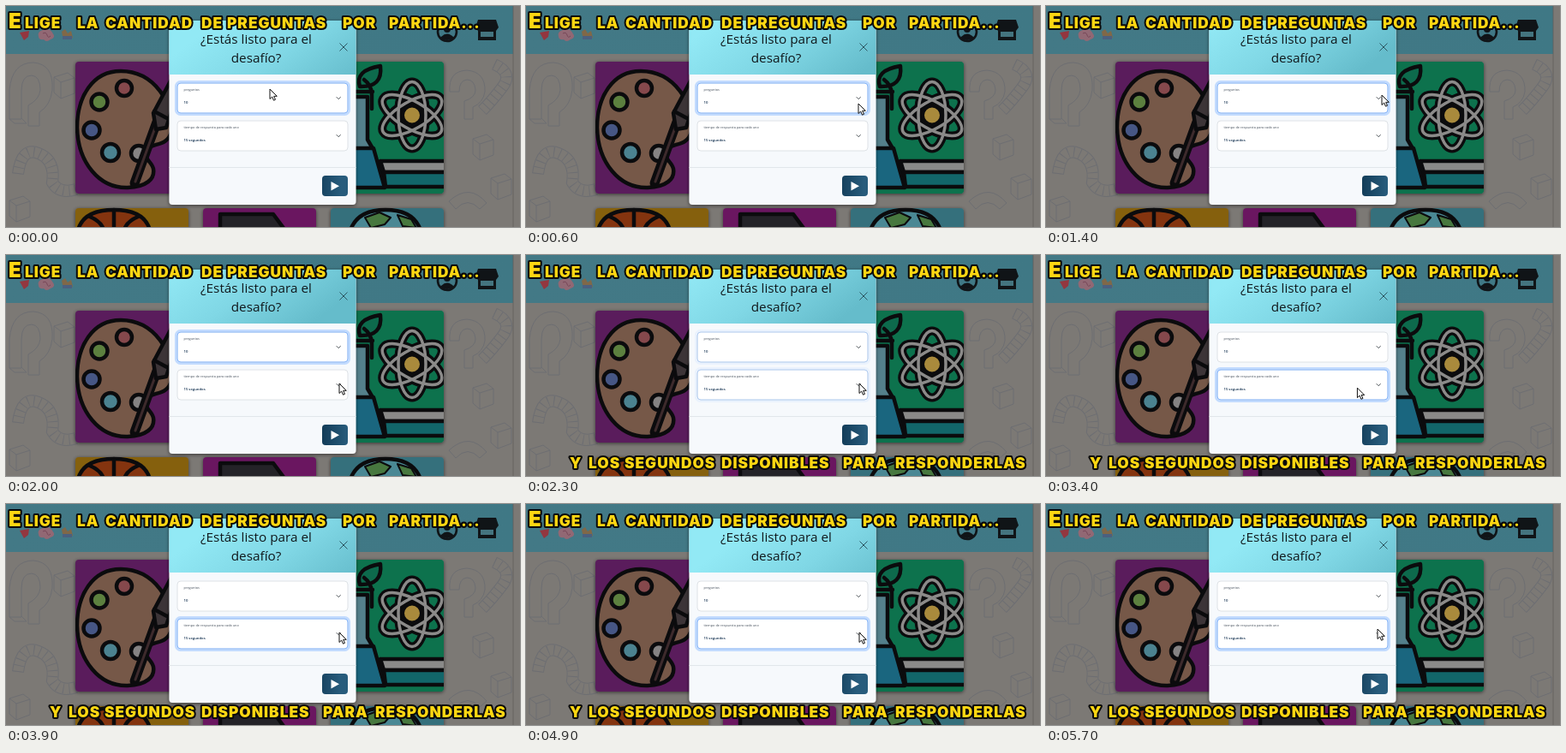
Recreate the animation shown at these times as an HTML page. Size 600 by 258 pixels, loop 6.1 s.

```html
<!DOCTYPE html>
<html lang="es">
<head>
<meta charset="utf-8">
<style>
  html, body { margin: 0; width: 100%; height: 100%; overflow: hidden; background: #7c7975 }
  svg { display: block; width: 100vw; height: 100vh }
  .ink { stroke: #0b0b0d; stroke-width: 4.5; stroke-linejoin: round; stroke-linecap: round }
  .line { fill: none }
  .doodle { fill: none; stroke: #6d6e72; stroke-width: 1 }
  .caption { font: 900 17.3px Inter, "DejaVu Sans", sans-serif; letter-spacing: 1px; fill: #ffd712;
    stroke: #0a0a0a; stroke-width: 4; stroke-linejoin: round; paint-order: stroke }
  .title { font: 15.3px "Open Sans", sans-serif; fill: #10181c; text-anchor: middle }
  .label { font: 3.9px "Open Sans", sans-serif; fill: #46505c }
  .value { font: 600 4.2px "Open Sans", sans-serif; fill: #12304f }
  .chevron { fill: none; stroke: #343a40; stroke-width: .9; stroke-linecap: round; stroke-linejoin: round }
</style>
</head>
<body>
<svg viewBox="0 0 600 258" preserveAspectRatio="none">
  <defs>
    <linearGradient id="head" x2="1" y2=".4">
      <stop stop-color="#92e9f5"/><stop offset=".5" stop-color="#80d7e5"/><stop offset="1" stop-color="#65bccb"/>
    </linearGradient>
    <linearGradient id="button"><stop stop-color="#123c58"/><stop offset="1" stop-color="#285c7c"/></linearGradient>
    <linearGradient id="bar"><stop stop-color="#437986"/><stop offset="1" stop-color="#3f7885"/></linearGradient>
    <filter id="shadow" x="-10%" y="-10%" width="120%" height="120%">
      <feDropShadow dx="0" dy="1" stdDeviation="2" flood-opacity=".55"/>
    </filter>
    <clipPath id="cardA"><rect x="81" y="65" width="150" height="154" rx="4"/></clipPath>
    <clipPath id="cardB"><rect x="379" y="65" width="132" height="154" rx="4"/></clipPath>
    <g id="orbits">
      <ellipse id="orbit" rx="16" ry="39"/>
      <use href="#orbit" transform="rotate(60)"/><use href="#orbit" transform="rotate(120)"/>
    </g>
    <g id="snakes">
      <path d="M14 196q4-32 24-24t16 34q8 14 28 8M570 68q22 10 10 26t-24 28"/>
    </g>
    <path id="block" d="M0 5l16-5 8 6v18l-16 6-8-7zM0 5l8 6 16-5M8 11v19"/>
  </defs>

  <!-- dimmed page -->
  <rect width="600" height="258" fill="#7c7975"/>
  <g class="doodle">
    <path d="M4 132V98q3-32 28-32 24 2 22 32-2 18-15 26v16H26v-24q13-7 14-18 0-16-10-17-12 0-12 18v33zM4 132l6 5h14l-6-6"/>
    <use href="#snakes" stroke-width="14"/>
    <use href="#snakes" stroke-width="12" stroke="#7c7975"/>
    <use href="#snakes" stroke-width="12" stroke-dasharray="1 6"/>
    <use href="#block" x="56" y="78"/><use href="#block" x="545" y="150"/>
    <use href="#block" x="566" y="196"/><use href="#block" x="4" y="222"/>
    <path d="M518 100q-2-24 20-25 22 2 21 25-2 13-14 18v14h-10v-21q13-4 13-13-1-12-10-12-9 1-9 14z"/>
    <path d="M517 228q24-22 44 2l-8 7q-14-15-28 0zM235 225l28 5M365 222l12 9"/>
  </g>
  <rect width="592" height="56" fill="url(#bar)"/>
  <path d="M592 0V258" stroke="#605e5c" stroke-width=".8"/>

  <!-- bar icons -->
  <path d="M16 31l11-2-1 7-5 4z" fill="#93363f"/>
  <path d="M38 36q-2-6 5-8 8-3 11 3 5 6-2 8-5 4-8 0-5 1-6-3z" fill="#926874"/>
  <path d="M43 32q4-2 5 2t4 1" fill="none" stroke="#774657"/>
  <path d="M65 30l4-3 3 5 4-3 2 8-7 2-5-4z" fill="#806848"/><path d="M66 35h11v4H66z" fill="#4b607f"/>
  <circle cx="515" cy="30" r="11" fill="none" stroke="#101417" stroke-width="2.600"/>
  <circle cx="515" cy="27" r="4" fill="#101417"/><path d="M507 37q8-9 16 0-8 6-16 0z" fill="#101417"/>
  <path d="M551 16h21l3 9-3 4v11h-21V29l-3-4z" fill="#101417"/><path d="M554 30h15v6h-15z" fill="#44747f"/>

  <!-- cards -->
  <g filter="url(#shadow)">
    <rect x="81" y="65" width="150" height="154" rx="4" fill="#5a1f5c"/>
    <rect x="379" y="65" width="132" height="154" rx="4" fill="#08724d"/>
    <rect x="81" y="236" width="132" height="30" rx="4" fill="#85600f"/>
    <rect x="230" y="236" width="132" height="30" rx="4" fill="#6a1860"/>
    <rect x="379" y="236" width="132" height="30" rx="4" fill="#34707c"/>
  </g>
  <g clip-path="url(#cardA)" class="ink">
    <path d="M134 76C101 76 83 106 83 142c1 41 26 71 59 70 22-1 32-10 30-22-2-9-13-12-8-22 6-9 24-3 29-21 4-33-20-71-59-71z" fill="#765848"/>
    <circle cx="138" cy="96" r="9" fill="#85484c"/>
    <circle cx="109" cy="112" r="9.5" fill="#5c803f"/>
    <circle cx="100" cy="145" r="9.5" fill="#465684"/>
    <circle cx="122" cy="171" r="10" fill="#4b8290"/>
    <circle cx="155" cy="172" r="9" fill="#858383"/>
    <path d="M178 130L150 207" stroke-width="11"/>
    <path d="M177 134L151 205" style="stroke:#3d2a2c;stroke-width:3"/>
    <path d="M196 80l-24 45 3 19 12-2 18-55z" fill="#3c3437"/>
    <path d="M173 123l15 8" class="line"/>
  </g>
  <g clip-path="url(#cardB)" class="ink">
    <path d="M427 120v-18q-1-10-9-16M413 94q-6-19 24-24 3 25-24 24zM408 100h20" fill="#0d6a4c"/>
    <path d="M405 106h17v50l7 12h-24z" fill="#54808b"/>
    <path d="M400 166h29l13 46h-42z" fill="#1a667f"/>
    <path d="M437 181h84v13h-80z" fill="#8a8a89"/>
    <path d="M441 194h80v17h-78z" fill="#12666a"/>
    <g transform="translate(474 127.500)">
      <use href="#orbits" class="line" stroke-width="10"/>
      <use href="#orbits" class="line" style="stroke:#8b8a89;stroke-width:3.500"/>
      <circle r="11" fill="#a98a3c" stroke-width="4"/>
    </g>
  </g>
  <g class="ink">
    <path d="M84 262q6-24 42-24t42 24z" fill="#84340f"/>
    <path class="line" d="M126 238v24M98 246q14 6 16 16M154 246q-14 6-16 16"/>
    <path d="M250 262v-19h62l14 19" fill="#242328"/>
    <path d="M402 262q8-24 41-24t41 24z" fill="#4a8894"/>
    <path d="M419 247l17-6 13 6-7 8-16 4zM457 244l16 5 6 10-16-2z" fill="#47783f" stroke-width="2"/>
  </g>

  <!-- dialog -->
  <rect x="190.500" y="17" width="218" height="215" rx="4" fill="#f6f9fc" filter="url(#shadow)"/>
  <path d="M190.500 80V21q0-4 4-4h210q4 0 4 4v59z" fill="url(#head)"/>
  <text class="title"><tspan x="292" y="44">¿Estás listo para el</tspan><tspan x="292" y="66">desafío?</tspan></text>
  <path d="M389.500 43.500l9 9m0-9l-9 9" stroke="#2b5560"/>
  <path d="M190.500 188.500h218" stroke="#e1e6ea"/>
  <g id="fields"></g>
  <rect x="369" y="198" width="30" height="24" rx="4" fill="url(#button)"/>
  <path d="M379.500 205v10.500l9.500-5.250z" fill="#fff"/>

  <text class="caption" y="26"><tspan x="3" font-size="24">E</tspan><tspan x="22">LIGE</tspan><tspan x="83">LA</tspan><tspan x="116">CANTIDAD</tspan><tspan x="228">DE</tspan><tspan x="258">PREGUNTAS</tspan><tspan x="393">POR</tspan><tspan x="447">PARTIDA...</tspan></text>
  <text class="caption" id="second" y="249"><tspan x="51">Y</tspan><tspan x="73">LOS</tspan><tspan x="115">SEGUNDOS</tspan><tspan x="228">DISPONIBLES</tspan><tspan x="370">PARA</tspan><tspan x="431">RESPONDERLAS</tspan></text>
  <path id="cursor" d="M0 0V11.500L2.700 9L4.500 13.200L6.500 12.300L4.700 8.300H8.300Z" fill="#fff" stroke="#111" stroke-width="1" stroke-linejoin="round"/>
</svg>
<script>
const $ = id => document.getElementById(id);
const LOOP = 6100, STEP = 100;

const field = (y, label, value) => `<g>
  <rect x="198.500" y="${y - 1.5}" width="202" height="38" rx="5" fill="none" stroke="#c2dbfe" stroke-width="3"/>
  <rect x="200" y="${y}" width="199" height="35" rx="4" fill="#fff" stroke="#dee2e6"/>
  <rect x="200" y="${y}" width="199" height="35" rx="4" fill="none" stroke="#86b7fe"/>
  <text class="label" x="207.500" y="${y + 9}">${label}</text>
  <text class="value" x="207.500" y="${y + 24}">${value}</text>
  <path class="chevron" d="M386 ${y + 16.5}l2.200 2.200 2.200-2.200"/></g>`;
$('fields').innerHTML = field(90, 'preguntas', '10') +
  field(134, 'tiempo de respuesta para cada uno', '15 segundos');

// pointer stops: time, x, y
const path = [
  [0, 308, 97], [600, 388, 114], [800, 388, 113], [1200, 392, 104], [1600, 392, 104],
  [1800, 391, 151], [2000, 389, 150], [2300, 389, 150], [3000, 324, 163],
  [3700, 389, 150], [5000, 389, 150], [5400, 387, 146], [LOOP, 387, 146]
];

function pointer(t) {
  const i = path.findIndex(k => k[0] > t);
  const [t0, x0, y0] = path[i - 1], [t1, x1, y1] = path[i];
  const u = (t - t0) / (t1 - t0), e = u * u * (3 - 2 * u);
  return [x0 + (x1 - x0) * e, y0 + (y1 - y0) * e];
}

function focus(group, amount) {
  const [ring, , border] = group.children;
  ring.setAttribute('opacity', amount * amount);
  border.setAttribute('opacity', amount);
}

function draw(now) {
  const t = Math.floor(now % LOOP / STEP) * STEP;
  const shift = Math.min(1, Math.max(0, (t - 2225) / 150));
  const [first, second] = $('fields').children;
  focus(first, 1 - shift);
  focus(second, shift);
  $('second').style.display = t < 2300 ? 'none' : '';
  $('cursor').setAttribute('transform', `translate(${pointer(t)})`);

  // the tints drift slowly sideways
  const drift = .2 - .2 * Math.cos(2 * Math.PI * (t - 1900) / LOOP);
  $('head').setAttribute('gradientTransform', `translate(${drift})`);
  $('button').setAttribute('gradientTransform', `translate(${-drift})`);
}

let start;
function tick(now) {
  start ??= now;
  draw(now - start);
  requestAnimationFrame(tick);
}
draw(0);
requestAnimationFrame(tick);
</script>
</body>
</html>
```
